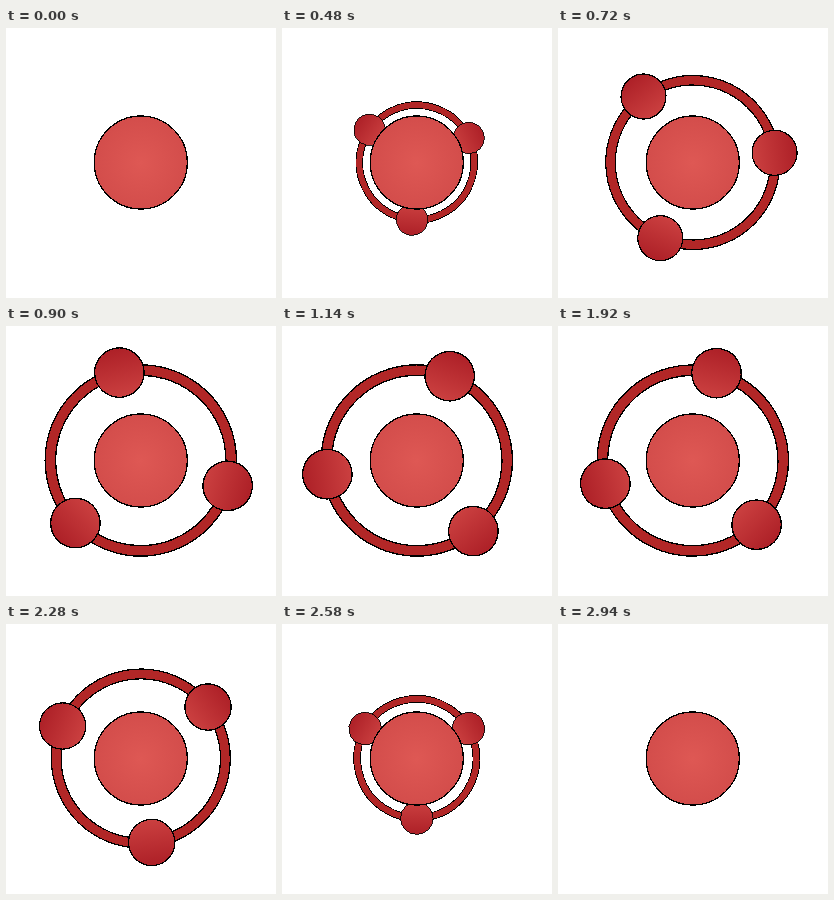
An HTML page that plays this animation: 270 by 270 pixels, repeating every 3660 ms.

```html
<!DOCTYPE html>
<html lang="en">
<head>
<meta charset="utf-8">
<title>Orbit</title>
<style>
  html, body { margin: 0; width: 100%; height: 100%; overflow: hidden; background: #fff; }
  svg { display: block; width: 100%; height: 100%; shape-rendering: crispEdges; }
</style>
</head>
<body>
<svg viewBox="0 0 270 270">
  <defs>
    <radialGradient id="coreFill">
      <stop offset="0" stop-color="#de5854"/>
      <stop offset="1" stop-color="#d34d4b"/>
    </radialGradient>
    <linearGradient id="ballFill">
      <stop offset="0" stop-color="#cb4040"/>
      <stop offset="1" stop-color="#ad2027"/>
    </linearGradient>
    <circle id="ball" cx="90.5" r="24.7" fill="url(#ballFill)" stroke="#000" stroke-width="1.3"/>
  </defs>
  <g transform="translate(134.8 134.5)">
    <g id="orbit">
      <circle r="90.4" fill="none" stroke="#000" stroke-width="11.8"/>
      <circle r="90.4" fill="none" stroke="#b22727" stroke-width="9.2"/>
      <use href="#ball"/>
      <use href="#ball" transform="rotate(120)"/>
      <use href="#ball" transform="rotate(240)"/>
    </g>
    <circle r="46.5" fill="url(#coreFill)" stroke="#000" stroke-width="1.3"/>
  </g>
</svg>
<script>
  const LOOP = 3660, STEP = 60, LAST_STEP = 2940;
  const HIDDEN_SCALE = 0.38;
  const SPIN = { start: 283, end: 2527, ramp: 600, turn: 240 };
  const orbit = document.getElementById('orbit');

  const smooth = (t, from, to) => {
    const u = Math.min(1, Math.max(0, (t - from) / (to - from)));
    return u * u * (3 - 2 * u);
  };

  const scaleAt = t =>
    HIDDEN_SCALE + (1 - HIDDEN_SCALE) * (smooth(t, 150, 900) - smooth(t, 2100, 3000));

  // Speeds up evenly, turns at constant speed, then slows down evenly.
  function angleAt(t) {
    const { start, end, ramp, turn } = SPIN;
    const speed = turn / (end - start - ramp);
    const eased = d => d <= 0 ? 0 : d < ramp ? speed * d * d / (2 * ramp) : speed * (d - ramp / 2);
    const turned = t < (start + end) / 2 ? eased(t - start) : turn - eased(end - t);
    return turned - 30;
  }

  function draw(now) {
    const t = Math.min(LAST_STEP, Math.floor((now % LOOP) / STEP) * STEP);
    orbit.setAttribute('transform', `rotate(${angleAt(t)}) scale(${scaleAt(t)})`);
  }

  const startTime = performance.now();
  function tick() {
    draw(performance.now() - startTime);
    requestAnimationFrame(tick);
  }
  tick();
</script>
</body>
</html>
```
